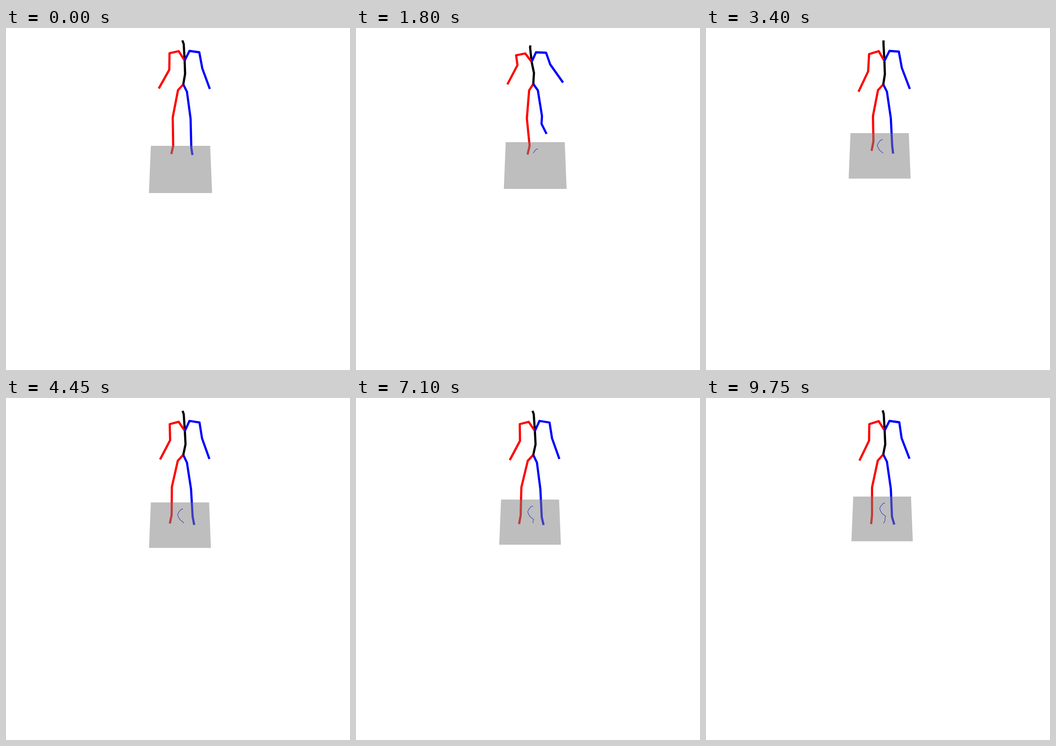
Recreate the animation shown at these times as an HTML page with a canvas. Size 751x746 px, loop 9800 ms.

```html
<!DOCTYPE html>
<html>
<head>
<meta charset="utf-8">
<style>
  html, body { margin: 0; width: 100%; height: 100%; overflow: hidden; background: #fff; }
  canvas { display: block; }
</style>
</head>
<body>
<canvas id="stage" width="751" height="746"></canvas>
<script>
const ctx = document.getElementById('stage').getContext('2d');
const LOOP = 9800, STEP = 50;

// Bones: "r" is the red side, "b" the blue side.
const chains = [
  ['#f00', 'root rHip rKnee rAnkle rToe'],
  ['#00f', 'root bHip bKnee bAnkle bToe'],
  ['#000', 'root spine chest neck head'],
  ['#f00', 'chest rCollar rShoulder rElbow rHand'],
  ['#00f', 'chest bCollar bShoulder bElbow bHand'],
].map(([color, joints]) => [color, joints.split(' ')]);

// Each pose lists only the joints that differ from the pose before it.
const stand = {
  root: [387, 123], spine: [391, 100], chest: [390, 71], neck: [388, 35], head: [385, 27],
  rHip: [375.5, 135.5], rKnee: [364, 195], rAnkle: [365, 257], rToe: [361, 275],
  bHip: [395, 139], bKnee: [403, 198], bAnkle: [404.5, 261], bToe: [407, 277],
  rCollar: [377, 50.5], rShoulder: [357, 55], rElbow: [356.5, 91], rHand: [333.5, 132],
  bCollar: [400.5, 50], bShoulder: [422, 53], bElbow: [428.5, 88], bHand: [445, 133],
};
const lean = {
  spine: [389.5, 99], chest: [386.5, 73], neck: [384.5, 39], head: [382, 34.5],
  rCollar: [373, 53], rShoulder: [353, 57], rElbow: [354, 87], rHand: [332, 128],
  bCollar: [396.5, 52], bShoulder: [418, 53.5], bElbow: [426, 84], bHand: [448, 127],
};
const stepBlue = {
  root: [387, 122], spine: [388.5, 98], chest: [383.5, 74], neck: [380, 42], head: [381, 38],
  rHip: [378, 136], rKnee: [373, 197], rAnkle: [379, 257], rToe: [374.5, 276],
  bHip: [397, 136], bKnee: [406, 192], bAnkle: [405, 209], bToe: [416, 231],
  rCollar: [369.5, 55.5], rShoulder: [349.5, 59.5], rElbow: [352.5, 81], rHand: [330.5, 123],
  bCollar: [393, 53], bShoulder: [415, 54], bElbow: [424, 79.5], bHand: [452, 119],
};
const stepRed = {
  ...lean, neck: [384, 37], head: [384, 31],
  rHip: [376.5, 135], rKnee: [367, 188], rAnkle: [369, 235], rToe: [365, 257],
  bHip: [396, 138], bKnee: [405, 196], bAnkle: [407, 257], bToe: [410, 275],
};
const arrive = {
  ...stand, spine: [390.5, 101], chest: [389.5, 72], neck: [387.5, 35], head: [387.5, 27],
  rKnee: [364.5, 192], rAnkle: [365.5, 247], rToe: [361.5, 268],
  bKnee: [403.5, 197], bAnkle: [406.5, 257], bToe: [408.5, 274],
  rShoulder: [356, 57], rElbow: [354, 94.5], rHand: [333, 139], bShoulder: [421, 51.5], bElbow: [427.5, 87],
};
const settle = {
  root: [387, 124], spine: [392, 101], chest: [390.5, 72], neck: [388, 35], head: [385.3, 28],
  rHip: [375, 137], rKnee: [362, 194], rAnkle: [361.5, 255], rToe: [357.5, 274],
  bHip: [395, 141], bKnee: [404, 199], bAnkle: [407.5, 259], bToe: [411, 277],
  rCollar: [377, 52], rShoulder: [357.5, 57], rElbow: [358.5, 92], rHand: [336.5, 134],
  bShoulder: [422.5, 53.5], bElbow: [428, 88], bHand: [444, 133],
};
const shift = {
  rKnee: [361, 195], rAnkle: [359.5, 256], rToe: [356, 275],
  bKnee: [402.5, 199], bAnkle: [405.5, 260], bToe: [409.5, 277], rElbow: [358, 93.5], rHand: [335.7, 135.5],
};
const finish = {
  ...stand, spine: [391.3, 101], head: [385.7, 27],
  rHip: [375, 136.5], rKnee: [362.5, 195], rAnkle: [362.5, 256], rToe: [360.5, 275],
  bKnee: [403.5, 198], bAnkle: [406, 259], bToe: [411, 276],
  rShoulder: [356.5, 57], rElbow: [356, 93], rHand: [335, 136.5], bElbow: [427, 87.5], bHand: [444.3, 132.5],
};
let current = {};
const poses = [
  [0, stand], [500, {}], [1000, lean], [1350, {}], [1800, stepBlue], [2300, stepRed], [2900, arrive],
  [3400, {}], [4600, settle], [5600, {}], [7100, shift], [8350, { bToe: [410.5, 277] }], [9750, finish],
].map(([time, moved]) => [time, current = { ...current, ...moved }]);

// Floor position: time, centre x, y of the near edge.
const floorKeys = [
  [0, 381, 360], [600, 381.3, 361.2], [1000, 382.6, 361.3], [1300, 385.5, 359.5], [1600, 389, 354.8],
  [1800, 391.3, 351], [2050, 392.6, 347], [2300, 391, 342], [2600, 387.5, 335.5], [2900, 381, 330],
  [3100, 379.6, 329], [3400, 379.1, 328.6], [4000, 379.4, 328.2], [5000, 380.3, 325.5], [5600, 380.6, 324],
  [6000, 380.6, 322], [7100, 380, 320], [8000, 381, 317.3], [8350, 381.6, 316.5], [9000, 382.8, 313.6],
  [9750, 384.5, 312.5],
];

const mix = (a, b, k) => a + (b - a) * k;

function span(keys, time) {
  const i = Math.max(1, keys.findIndex(key => key[0] >= time));
  const a = keys[i - 1], b = keys[i];
  return [a, b, (time - a[0]) / (b[0] - a[0])];
}

function poseAt(time) {
  const [a, b, k] = span(poses, time);
  const ease = k * k * (3 - 2 * k);
  return name => a[1][name].map((v, axis) => mix(v, b[1][name][axis], ease));
}

// The floor lies in perspective: depth is the inverse distance below the horizon.
const HORIZON = -1352, FLOOR_DEPTH = 3.739e-5;
const depthOf = y => 1 / (y - HORIZON);
const yOf = depth => HORIZON + 1 / depth;
const halfWidth = y => 0.04025 * (y - HORIZON);

function floorAt(time) {
  const [a, b, k] = span(floorKeys, time);
  return { x: mix(a[1], b[1], k), depth: depthOf(mix(a[2], b[2], k)) };
}

function trace(points) {
  ctx.beginPath();
  points.forEach(([x, y]) => ctx.lineTo(x, y));
}

function stroke(points, color, width) {
  trace(points);
  ctx.strokeStyle = color;
  ctx.lineWidth = width;
  ctx.stroke();
}

function drawTrail(time, floor) {
  const points = [];
  for (let past = 0; past <= time; past += STEP) {
    const then = floorAt(past);
    points.push([387 + (floor.x - then.x) * 0.96, yOf(depthOf(273) + floor.depth - then.depth)]);
  }
  stroke(points, '#00f', 1.2);
}

function drawFloor({ x, depth }) {
  const near = yOf(depth), far = yOf(depth + FLOOR_DEPTH);
  const w = halfWidth(near), v = halfWidth(far);
  trace([[x - w, near], [x - v, far], [x + v, far], [x + w, near]]);
  ctx.fillStyle = 'rgba(127,127,127,.5)';
  ctx.fill();
}

function draw(now) {
  const time = Math.floor(now % LOOP / STEP) * STEP;
  const joint = poseAt(time), floor = floorAt(time);
  ctx.clearRect(0, 0, 751, 746);
  ctx.lineJoin = 'round';
  if (time > STEP) drawTrail(time, floor);
  chains.forEach(([color, names]) => stroke(names.map(joint), color, 4.8));
  drawFloor(floor);
  requestAnimationFrame(draw);
}
requestAnimationFrame(draw);
</script>
</body>
</html>
```
